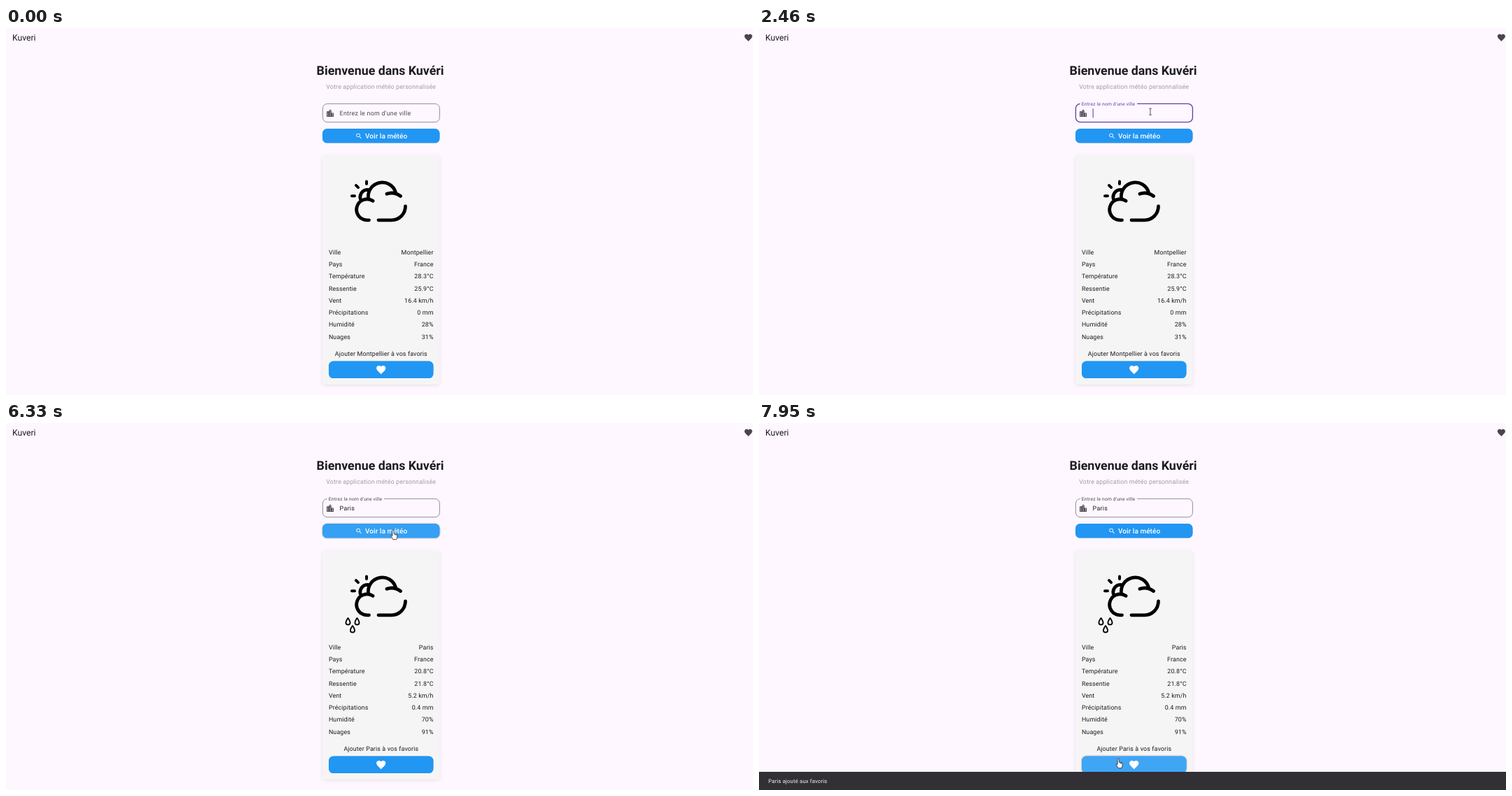
These frames come from a looping animation (1067x525 px, 7990 ms). An HTML page:

```html
<!DOCTYPE html>
<html lang="fr">
<head>
<meta charset="utf-8">
<title>Météo</title>
<style>
  html, body { margin: 0; width: 100%; height: 100%; overflow: hidden; background: #fef7ff; }
  svg { display: block; }
  text { font: 8.89px Roboto, sans-serif; letter-spacing: .139px; fill: #1d1b20; text-rendering: geometricPrecision; }
  .input { letter-spacing: .278px; }
  .mid { text-anchor: middle; }
  .end { text-anchor: end; }
  .button { fill: #2196f3; filter: drop-shadow(0 .4px .5px #0003); }
  .button.hover { filter: drop-shadow(0 .9px 1px #0005); }
  .light { fill: #fff; }
  .weather { fill: none; stroke: #000; stroke-width: 4.8; stroke-linecap: round; stroke-linejoin: round; }
  .cursor { fill: #fff; stroke: #222; stroke-width: .8; stroke-linejoin: round; }
</style>
</head>
<body>
<svg width="1067" height="525" viewBox="0 0 1067 525">
  <defs>
    <path id="heart" d="M12 21.35l-1.45-1.32C5.4 15.36 2 12.28 2 8.5 2 5.42 4.42 3 7.5 3c1.74 0 3.41.81 4.5 2.09C13.09 3.81 14.76 3 16.5 3 19.58 3 22 5.42 22 8.5c0 3.78-3.4 6.86-8.55 11.54z"/>
    <clipPath id="searchClip"><rect x="452" y="144" width="167.5" height="20.6" rx="6.6"/></clipPath>
    <clipPath id="favClip"><rect x="461" y="476.5" width="149.5" height="24.6" rx="6.6"/></clipPath>
  </defs>

  <text x="8.9" y="18" style="font-size:12.22px;letter-spacing:0">Kuveri</text>
  <use href="#heart" transform="translate(1053.7 7.1) scale(.5557)" fill="#49454f"/>
  <text x="443.6" y="66.8" style="font-size:17.8px;font-weight:600;letter-spacing:0">Bienvenue dans Kuvéri</text>
  <text class="mid" x="535.7" y="87.2" style="fill:#9e9e9e">Votre application météo personnalisée</text>

  <rect id="field" x="452.4" y="108.4" width="167" height="26.3" rx="6.6" fill="none"/>
  <rect id="gap" y="107" height="3" fill="#fef7ff"/>
  <path transform="translate(456.4 115.4) scale(.5557)" fill="#49454f" d="M15 11V5l-3-3-3 3v2H3v14h18V11h-6zm-8 8H5v-2h2v2zm0-4H5v-2h2v2zm0-4H5V9h2v2zm6 8h-2v-2h2v2zm0-4h-2v-2h2v2zm0-4h-2V9h2v2zm0-4h-2V5h2v2zm6 12h-2v-2h2v2zm0-4h-2v-2h2v2z"/>
  <text id="label" class="input">Entrez le nom d'une ville</text>
  <text id="typed" class="input" x="476.6" y="124.6"></text>
  <rect id="caret" y="115.4" width="1.1" height="13" fill="#5c42a6"/>

  <rect id="search" class="button" x="452" y="144" width="167.5" height="20.6" rx="6.6"/>
  <g clip-path="url(#searchClip)" class="light">
    <rect id="searchHover" x="452" y="144" width="168" height="21"/><circle id="searchRipple"/>
  </g>
  <path class="light" transform="translate(499 149.4) scale(.43)" d="M15.5 14h-.79l-.28-.27A6.47 6.47 0 0 0 16 9.5 6.5 6.5 0 1 0 9.5 16c1.61 0 3.09-.59 4.23-1.57l.27.28v.79l5 4.99L20.49 19zm-6 0C7 14 5 12 5 9.5S7 5 9.5 5 14 7 14 9.5 12 14 9.5 14z"/>
  <text x="513" y="158" style="font-size:10px;font-weight:500;letter-spacing:.056px;fill:#fff">Voir la météo</text>

  <rect x="452" y="183" width="167.5" height="327" rx="4" fill="#f5f5f5" style="filter:drop-shadow(0 1px 2.5px #00000018)"/>
  <g class="weather">
    <path d="M518.5 274.8H516A15 15 0 1 1 524 247.3M517.5 243A20 20 0 0 1 556.5 235M544 237.3Q554 233.5 563.5 240.5M532 274.8H551A19.5 20 0 0 0 570.5 255M506.8 246A10.5 10.5 0 0 1 517 231.3"/>
    <path stroke-width="4" d="M515 219.5v3.5M500 225.2l3 3M494 240.2h4"/>
    <g id="rain" stroke-width="1.9"></g>
  </g>
  <g id="rows"></g>
  <text id="favText" class="mid" x="535.8" y="468.6"></text>
  <rect id="fav" class="button" x="461" y="476.5" width="149.5" height="24.6" rx="6.6"/>
  <g clip-path="url(#favClip)" class="light">
    <rect id="favHover" x="461" y="476" width="150" height="26"/><circle id="favRipple"/>
  </g>
  <use href="#heart" class="light" transform="translate(527.7 480.9) scale(.667)"/>

  <rect id="scrollbar" x="639.4" y="30" width="4.5" height="493" rx="1"/>
  <g id="snack">
    <rect y="499" width="1067" height="27" fill="#322f35"/>
    <text id="snackText" x="13.3" y="514.8" style="font-size:7.78px;fill:#f5eff7">Paris ajouté aux favoris</text>
  </g>

  <g id="pointer">
    <path id="arrow" class="cursor" d="M0 0V9.4L2.2 7.5 3.7 10.8 5 10.2 3.5 7H6.4z"/>
    <path id="beam" fill="none" stroke="#444" stroke-width=".9" d="M-1.8-4.3H1.8M-1.8 4.7H1.8M0-4.3V4.7"/>
    <path id="hand" class="cursor" d="M-1.1 7.5V.3a1.1 1.1 0 0 1 2.2 0V4.2q3.5 .2 4.7 1.4V9q-.2 2-1.1 3.7H0Q-1.3 10-3.4 7.7q-.1-1.8 2.3-.2M2.7 4.5v2M4.3 5v1.6"/>
  </g>
</svg>
<script>
const LOOP = 7990;
const $ = id => document.getElementById(id);
const set = (id, attrs) => { for (const k in attrs) $(id).setAttribute(k, attrs[k]); };
const show = (id, on) => set(id, { opacity: +on });
const clamp = p => Math.max(0, Math.min(1, p));
const span = (t, a, b) => clamp((t - a) / (b - a));
const lerp = (a, b, p) => a + (b - a) * p;
const easeOut = p => 1 - (1 - p) ** 2.3;
const smooth = p => p * p * (3 - 2 * p);
const within = (t, ...ranges) => ranges.some(([a, b]) => t >= a && t < b);

const names = ['Ville', 'Pays', 'Température', 'Ressentie', 'Vent', 'Précipitations', 'Humidité', 'Nuages'];
const cities = [
  ['Montpellier', 'France', '28.3°C', '25.9°C', '16.4 km/h', '0 mm', '28%', '31%'],
  ['Paris', 'France', '20.8°C', '21.8°C', '5.2 km/h', '0.4 mm', '70%', '91%']
];
const keyTimes = [2780, 3040, 3160, 3320, 3440];
// time, x, y of the pointer's hotspot
const path = [
  [350, 942, 516], [510, 842, 419], [670, 715, 297], [790, 640, 226], [940, 576, 169],
  [1060, 567, 152], [1180, 563, 139], [1400, 559, 119.5], [3900, 559, 119.5], [3930, 560, 119.5],
  [3960, 560, 119.5], [3970, 561, 119.5], [4330, 561, 119.5], [4650, 553, 154], [6330, 553, 154],
  [6370, 551, 154], [6640, 551, 154], [7270, 513.3, 481], [LOOP, 513.3, 481]
];

$('rows').innerHTML = names.map((name, i) => {
  const y = 323.7 + i * 17.28;
  return `<text x="460.9" y="${y}">${name}</text><text class="end value" x="610.6" y="${y}"></text>`;
}).join('');
$('rain').innerHTML = [[488.5, 279], [501.5, 279], [495, 290]].map(([x, y]) =>
  `<path d="M${x} ${y}C${x - 5} ${y + 7} ${x - 3} ${y + 9.5} ${x} ${y + 9.5}S${x + 5} ${y + 7} ${x} ${y}z"/>`).join('');
const values = document.querySelectorAll('.value');

function pointerAt(t) {
  const i = Math.max(1, path.findIndex(k => k[0] > t));
  const [a, x0, y0] = path[i - 1], [b, x1, y1] = path[i];
  let p = span(t, a, b);
  if (a > 4000) p = smooth(p);
  return [lerp(x0, x1, p), lerp(y0, y1, p)];
}

function ripple(id, t, start, x, y, cy, radius, fade) {
  const p = easeOut(span(t, start, start + 225));
  set(id, {
    cx: lerp(x, 535.7, p), cy: lerp(y, cy, p), r: radius * lerp(.3, 1, p),
    opacity: t < start ? 0 : .1 * span(t, start, start + 75) * (1 - fade)
  });
}

function drawField(t, hovered) {
  const focused = within(t, [1480, 4830]);
  const float = smooth(span(t, 1480, 1650));
  const text = 'Paris'.slice(0, keyTimes.filter(k => t >= k).length);
  set('field', {
    stroke: focused ? '#5c42a6' : hovered ? '#1d1b20' : '#79747e',
    'stroke-width': focused ? 1.3 : .8
  });
  set('gap', { x: lerp(499, 458.6, float), width: 81.5 * float });
  set('label', {
    transform: `translate(${lerp(476.6, 460.8, float)} ${lerp(124.6, 110.9, float)}) scale(${lerp(1, .75, float)})`,
    style: `fill:${focused ? '#5c42a6' : '#49454f'}`
  });
  $('typed').textContent = text;
  set('caret', { x: 476.6 + (text ? $('typed').getComputedTextLength() : 0) });
  show('caret', within(t, [1480, 1970], [2460, 3930], [4430, 4830]));
}

function drawButton(id, hovered) {
  $(id).classList.toggle('hover', hovered);
  set(id + 'Hover', { opacity: hovered ? .09 : 0 });
}

function draw(t) {
  const [x, y] = pointerAt(t);
  const inside = t >= 350 && x > 452 && x < 619.5;
  const onField = inside && y > 108 && y < 135;
  const onSearch = inside && y > 144 && y < 164.6;
  const onFav = inside && y > 476.5;

  drawField(t, onField);
  drawButton('search', onSearch);
  drawButton('fav', onFav);
  ripple('searchRipple', t, 4855, 553, 154, 154.3, 84.4, span(t, 5120, 5240));
  ripple('favRipple', t, 7590, 513, 481, 488.8, 75.7, .5 * span(t, 7800, 7950));

  const city = cities[t < 5130 ? 0 : 1];
  values.forEach((v, i) => { v.textContent = city[i]; });
  $('favText').textContent = `Ajouter ${city[0]} à vos favoris`;
  show('rain', t >= 5130);

  set('scrollbar', { opacity: .1 * span(t, 750, 850) * (1 - span(t, 950, 1180)) });

  const rise = span(t, 7670, 7920);
  set('snack', { transform: `translate(0 ${26.5 * (1 - smooth(easeOut(rise)))})` });
  set('snackText', { opacity: span(rise, .4, 1) });

  set('pointer', { transform: `translate(${x} ${y})` });
  show('pointer', t >= 350);
  show('beam', onField);
  show('hand', onSearch || onFav);
  show('arrow', !(onField || onSearch || onFav));
}

const start = performance.now();
(function tick() {
  draw((performance.now() - start) % LOOP);
  requestAnimationFrame(tick);
})();
</script>
</body>
</html>
```
